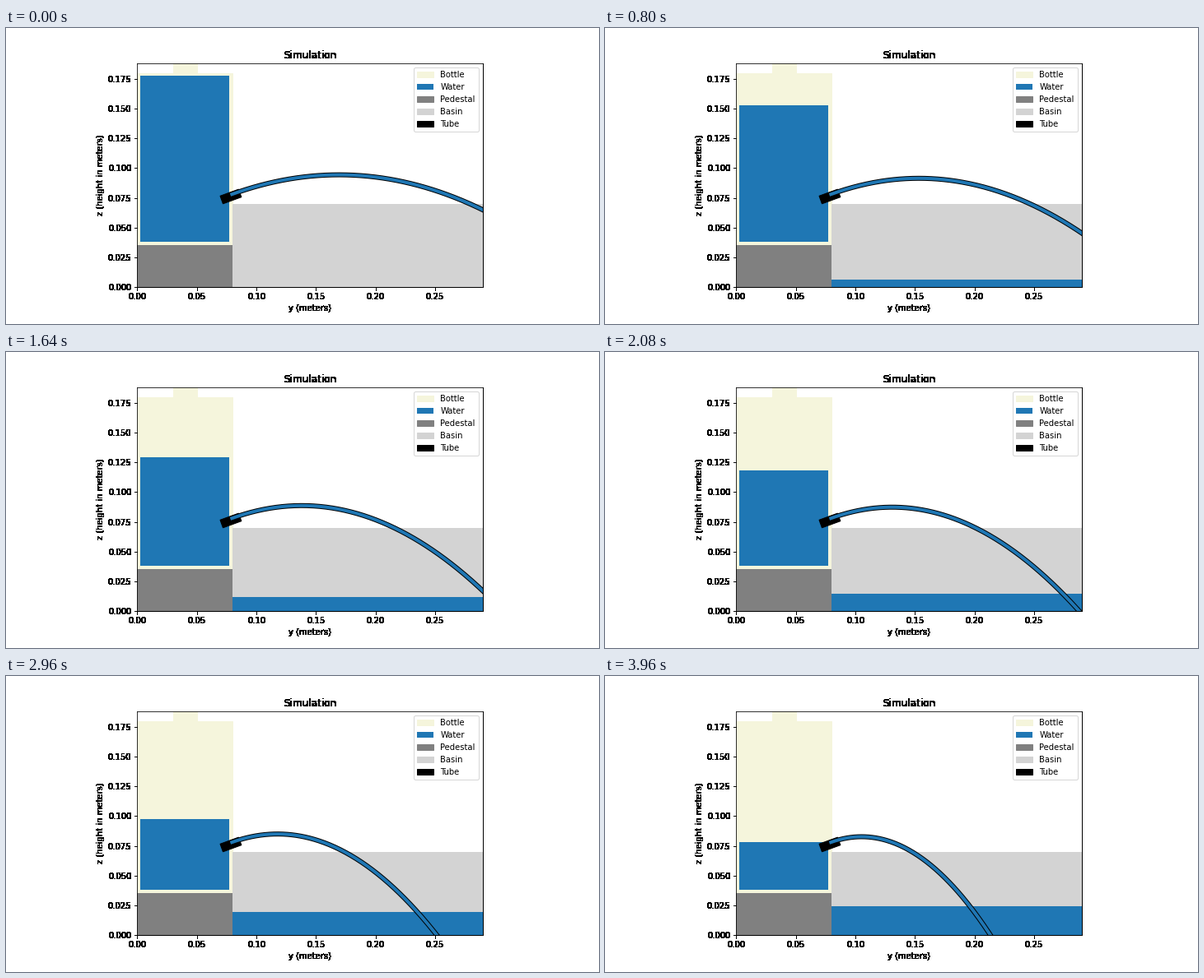
Write a matplotlib script that moves like this. It is 720 px wide and 360 px high and loops after 4 s.

```python
import numpy as np
import matplotlib.pyplot as plt
from matplotlib.animation import FuncAnimation
from matplotlib.patches import Rectangle

FRAMES, INTERVAL = 100, 40
X_MAX, Z_MAX = 0.29, 0.188

FLOOR = 0.038                 # bottom of the water in the bottle
DEPTH = 0.14                  # water depth at the start
DRAIN = 0.001758              # loss of sqrt(depth) per frame
BASIN_RATIO = 0.24            # rise in the basin per drop in the bottle
ANGLE = 20
JET_X, JET_Z = 0.0795, 0.078

plt.rcParams["font.family"] = "DejaVu Sans"
plt.rcParams["figure.subplot.bottom"] = 0.125

fig, ax = plt.subplots(figsize=(10, 5), dpi=72)
fig.set_facecolor("white")
ax.set_aspect("equal")
ax.set_xlim(0, X_MAX)
ax.set_ylim(0, Z_MAX)
ax.set_xticks(np.arange(6) * 0.05)
ax.set_yticks(np.arange(8) * 0.025)
ax.set_title("Simulation")
ax.set_xlabel("y (meters)")
ax.set_ylabel("z (height in meters)")


def harden(img, dpi):
    """Turn every touched pixel solid black."""
    out = np.zeros_like(img)
    out[..., 3] = img[..., 3] > 0
    return out, 0, 0


for artist in (ax.title, ax.xaxis, ax.yaxis):
    artist.set_agg_filter(harden)
for side in ("right", "bottom"):
    ax.spines[side].set_linewidth(1)


def box(x, z, w, h, **style):
    return ax.add_patch(Rectangle((x, z), w, h, **style))


box(0, 0.035, 0.08, 0.145, color="beige", label="Bottle")
box(0.03, 0.18, 0.02, 0.02, color="beige")
water = box(0.0025, FLOOR, 0.075, DEPTH, label="Water")
box(0, 0, 0.08, 0.035, color="grey", label="Pedestal")
box(0.08, 0, 0.3, 0.07, color="lightgrey", label="Basin")
pool = box(0.08, 0, 0.3, 0)
box(0.072, 0.07, 0.0165, 0.007, angle=ANGLE, color="black", label="Tube")

rim, = ax.plot([], [], color="black", lw=6)
jet, = ax.plot([], [], color="C0", lw=4)
ax.legend(loc="upper right")

reach = np.linspace(0, 0.3, 400)
slope = np.tan(np.radians(ANGLE))
cos2 = np.cos(np.radians(ANGLE)) ** 2


def update(i):
    depth = (np.sqrt(DEPTH) - DRAIN * i) ** 2
    water.set_height(depth)
    pool.set_height(BASIN_RATIO * (DEPTH - depth))
    # ballistic path with v^2 = 2 g depth
    path = JET_Z + slope * reach - reach ** 2 / (4 * depth * cos2)
    for line in (rim, jet):
        line.set_data(JET_X + reach, path)
    return water, pool, rim, jet


anim = FuncAnimation(fig, update, frames=FRAMES, interval=INTERVAL,
                     init_func=lambda: update(0), repeat=True, repeat_delay=0)
plt.show()
```
